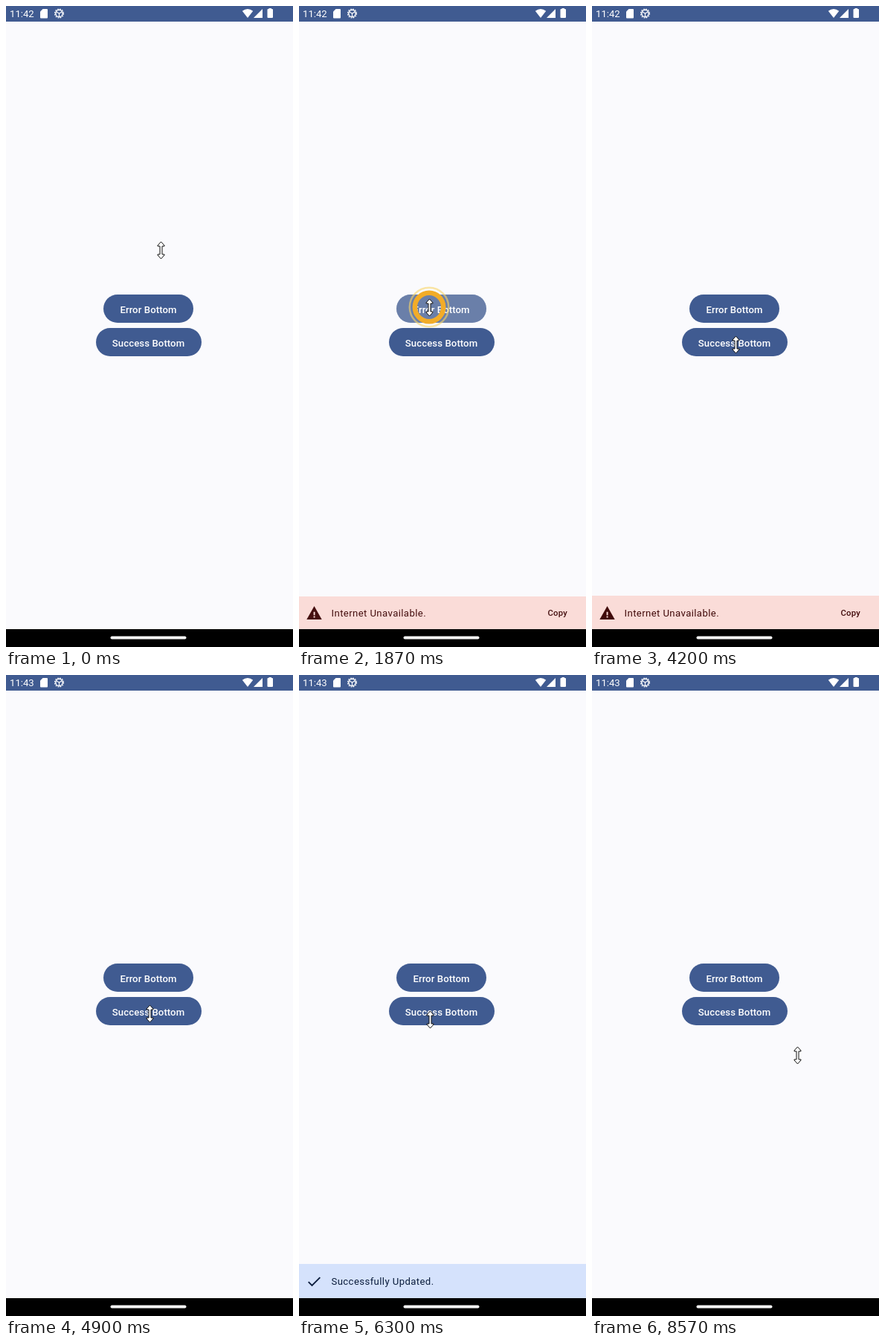
Animation, 386 px wide and 862 px high, one loop 8.91 s. Source, as an HTML page:

```html
<!DOCTYPE html>
<html lang="en">
<head>
<meta charset="utf-8">
<title>Bottom messages</title>
<style>
  html, body { margin: 0; width: 100%; height: 100%; overflow: hidden; background: #fafafd; }
  svg { display: block; width: 100vw; height: 100vh; }
  text { font: 400 13.15px Roboto, sans-serif; }
  .label { font-weight: 500; letter-spacing: .094px; text-anchor: middle; fill: #fff; }
  .message { letter-spacing: .4px; }
  .action { font-size: 11.3px; font-weight: 500; letter-spacing: .2px; }
</style>
</head>
<body>
<svg viewBox="0 0 386 862" xmlns="http://www.w3.org/2000/svg">
  <defs>
    <clipPath id="errorClip"><rect id="errorWindow" width="386"/></clipPath>
    <clipPath id="successClip"><rect id="successWindow" width="386"/></clipPath>
    <rect id="errorShape" x="131" y="388" width="121" height="38" rx="19"/>
    <rect id="successShape" x="121" y="433" width="142" height="38" rx="19"/>
  </defs>

  <rect width="386" height="862" fill="#fafafd"/>

  <!-- Status bar -->
  <rect width="386" height="21" fill="#405b91"/>
  <g fill="#fff">
    <text id="clock" x="5" y="15">11:42</text>
    <path d="M49.500 4H55q1 0 1 1v10.500q0 1-1 1H47q-1 0-1-1V7.500Z"/>
    <g fill="none" stroke="#fff" stroke-width="1.200">
      <circle cx="71.500" cy="10" r="4.700" stroke-width="1.500"/>
      <circle cx="71.500" cy="10" r="6" stroke-dasharray="1.700 1.442"/>
      <path d="M71.500 14.500V10L67.600 7.700M71.500 10L75.400 7.700"/>
    </g>
    <path d="M325 16L317.800 6.800Q325 1.200 332.200 6.800Z"/>
    <path d="M345 4V16H333Z"/>
    <path d="M353.500 4V3H357V4H358q1 0 1 1V15q0 1-1 1H352.500q-1 0-1-1V5q0-1 1-1Z"/>
  </g>

  <!-- Buttons -->
  <g fill="#405b91"><use href="#errorShape"/><use href="#successShape"/></g>
  <g fill="#fff"><use id="errorRipple" href="#errorShape"/><use id="successRipple" href="#successShape"/></g>
  <text class="label" x="191.500" y="412.500">Error Bottom</text>
  <text class="label" x="191.500" y="457.800">Success Bottom</text>

  <!-- Messages -->
  <g id="errorBar" clip-path="url(#errorClip)" fill="#410a0a">
    <rect y="793" width="386" height="45" fill="#fadcd8"/>
    <path d="M10.300 825L20.500 807L30.700 825ZM19.600 819.300h1.900v-4.600h-1.900ZM19.600 822.500h1.900v-1.900h-1.900Z" fill-rule="evenodd"/>
    <text class="message" x="43.500" y="820.700">Internet Unavailable.</text>
    <text class="action" x="334.500" y="820.200">Copy</text>
  </g>
  <g id="successBar" clip-path="url(#successClip)">
    <rect y="792" width="386" height="46" fill="#d5e2fc"/>
    <path d="M12.700 816.200L17.500 821L28.300 810.200" fill="none" stroke="#0a1c3c" stroke-width="1.900"/>
    <text class="message" x="43.500" y="820.200" fill="#0a1c3c">Successfully Updated.</text>
  </g>

  <!-- Navigation bar -->
  <rect y="838" width="386" height="24"/>
  <rect x="140.500" y="847.500" width="102" height="4" rx="2" fill="#f6f6f6"/>

  <g id="pulse" fill="none">
    <circle id="halo" stroke="#f8d66a"/>
    <circle id="ring" stroke="#f2ac28"/>
  </g>
  <path id="cursor" d="M0-11.500L4.500-6.500V-5.500H1.500V5.500H4.500V6.500L0 11.500L-4.500 6.500V5.500H-1.500V-5.500H-4.500V-6.500Z" fill="#fff" stroke="#111"/>
</svg>

<script>
const LOOP = 8910;
const BOTTOM = 838;
const HOME = [208, 328];

// Each stroke glides to a point; swing bends the path into a loop.
const strokes = [
  { start: 200, end: 900, to: [190, 308], swing: [34, 96] },
  { start: 1330, end: 1520, to: [175, 405] },
  { start: 2870, end: 3730, to: [175, 399], swing: [-60, 88] },
  { start: 3770, end: 4200, to: [193, 455], swing: [-62, 48] },
  { start: 6170, end: 6300, to: [176, 463] },
  { start: 6300, end: 7030, to: [241, 538], swing: [-40, 40] },
  { start: 7070, end: 7470, to: [276, 511] }
];

const actions = [
  { name: "error", click: 1540, height: 45 },
  { name: "success", click: 5230, height: 46 }
];

const $ = id => document.getElementById(id);
const set = (id, attrs) => {
  for (const name in attrs) $(id).setAttribute(name, attrs[name]);
};
const clamp = v => Math.min(1, Math.max(0, v));
const lerp = (a, b, u) => a + (b - a) * u;

function pointerAt(t) {
  let from = HOME;
  for (const { start, end, to, swing = [0, 0] } of strokes) {
    if (t < start) break;
    const u = clamp((t - start) / (end - start));
    const x = lerp(from[0], to[0], u) + swing[0] * Math.sin(2 * Math.PI * u);
    const y = lerp(from[1], to[1], u) + swing[1] * Math.sin(Math.PI * u) ** 4;
    from = [x, y];
    if (u < 1) break;
  }
  return from;
}

// Critically damped spring from 0 to 1.
function spring(ms) {
  const x = Math.max(0, ms) * 0.02;
  return 1 - (1 + x) * Math.exp(-x);
}

function drawBar({ name, click, height }, t) {
  const shown = spring(t - click - 50) - spring(t - click - 3070);
  const visible = Math.round(height * shown);
  set(name + "Window", { y: BOTTOM - visible, height: visible });
  set(name + "Bar", { opacity: visible ? shown : 0 });
}

function drawRipple({ name, click }, t) {
  const age = t - click;
  set(name + "Ripple", { opacity: 0.22 * clamp(age / 200) * clamp((700 - age) / 250) });
}

const spread = ms => 36 * (1 - Math.exp(-0.0072 * Math.max(0, ms)));

function drawPulse(t) {
  const action = actions.find(a => t >= a.click && t < a.click + 790);
  set("pulse", { visibility: action ? "visible" : "hidden" });
  if (!action) return;
  const age = t - action.click;
  const [x, y] = pointerAt(action.click);
  const outer = spread(age - 150);
  const inner = spread(age - 225);
  set("pulse", { transform: `translate(${x} ${y})`, opacity: clamp((790 - age) / 400) });
  set("halo", { r: outer, "stroke-width": Math.min(2.5, outer), opacity: lerp(1, 0.6, clamp((age - 240) / 90)) });
  set("ring", { r: inner, "stroke-width": Math.min(6.5, inner * 1.6) });
}

function draw(t) {
  $("clock").textContent = t < 4500 ? "11:42" : "11:43";
  for (const action of actions) {
    drawBar(action, t);
    drawRipple(action, t);
  }
  drawPulse(t);
  const [x, y] = pointerAt(t).map(v => Math.round(v) + 0.5);
  set("cursor", { transform: `translate(${x} ${y})` });
}

const begin = performance.now();
function tick() {
  draw((performance.now() - begin) % LOOP);
  requestAnimationFrame(tick);
}
tick();
</script>
</body>
</html>
```
